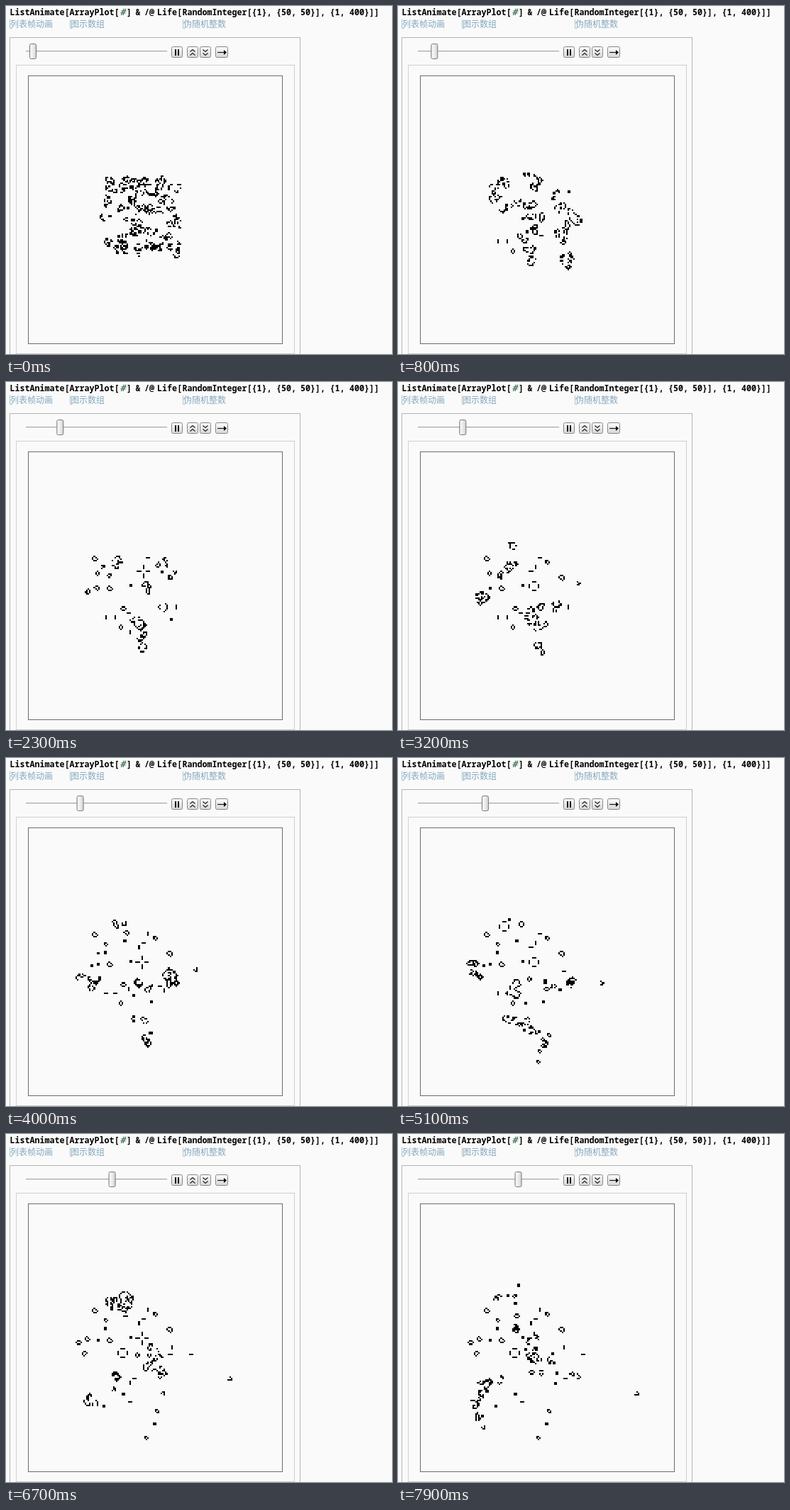
An HTML page with a canvas for the animation above (8 s loop, 544 by 491 pixels).

```html
<!DOCTYPE html>
<html lang="en">
<head>
<meta charset="utf-8">
<title>Life</title>
<style>
html, body { margin: 0; width: 100%; height: 100%; overflow: hidden; background: #fafafa; }
svg, canvas { position: absolute; left: 0; top: 0; width: 544px; height: 491px; }
.code { font: bold 11.67px "Noto Sans Mono", "DejaVu Sans Mono", monospace; fill: #000; }
.code .slot { fill: #437958; font-style: italic; font-size: 13px; }
.hint { font: 300 12px "Noto Sans CJK SC", "Noto Sans CJK", sans-serif; fill: #82a9bc; }
.tick { fill: none; stroke: #a9c3d0; }
.button rect { fill: url(#face); stroke: #858585; }
.icon { fill: none; stroke: #222; stroke-width: 1.3; }
#thumb { animation: slide 8s steps(80) infinite; }
@keyframes slide { to { transform: translateX(133.2px); } }
</style>
</head>
<body>
<svg viewBox="0 0 544 491">
  <defs>
    <linearGradient id="face" x2="0" y2="1">
      <stop offset="0" stop-color="#fcfcfc"/>
      <stop offset="1" stop-color="#d8d8d8"/>
    </linearGradient>
    <linearGradient id="knob">
      <stop offset="0" stop-color="#fafafa"/>
      <stop offset=".5" stop-color="#ededed"/>
      <stop offset="1" stop-color="#cfcfcf"/>
    </linearGradient>
    <path id="chevrons" class="icon" d="M-3.500 -1l3.500-3 3.500 3M-3.500 4l3.500-3 3.500 3"/>
  </defs>
  <g class="code">
    <text x="5.5" y="13">ListAnimate[</text>
    <text x="89.5" y="13">ArrayPlot[</text>
    <text x="160.500" y="13" class="slot">#</text>
    <text x="170" y="13">]</text>
    <text x="182.5" y="13">&amp;</text>
    <text x="195" y="13">/@</text>
    <text x="213" y="13">Life[</text>
    <text x="248.5" y="13">RandomInteger[</text>
    <text x="346.5" y="13">{1},</text>
    <text x="381" y="13">{50,</text>
    <text x="415" y="13">50}],</text>
    <text x="456.5" y="13">{1,</text>
    <text x="484" y="13">400}]]</text>
  </g>
  <g class="hint">
    <text x="6" y="30">列表帧动画</text>
    <text x="91" y="30">图示数组</text>
    <text x="250" y="30">伪随机整数</text>
  </g>
  <path class="tick" d="M5.500 19v12.500h3M90.500 19v12.500h3M249.500 19v12.500h3"/>
  <rect x="5.500" y="44.500" width="409" height="460" fill="none" stroke="#b5b5b5"/>
  <rect x="14.500" y="83.500" width="392" height="407" fill="none" stroke="#d0d0d0"/>
  <rect x="31.500" y="98.500" width="358" height="378" fill="none" stroke="#6b6b6b"/>
  <path d="M28 63.500h199" stroke="#a6a6a6"/>
  <path d="M28 64.500h199" stroke="#e6e6e6"/>
  <rect id="thumb" x="33.500" y="53.500" width="9" height="21" rx="2" fill="url(#knob)" stroke="#777"/>
  <g class="button">
    <rect x="233.500" y="57.500" width="15" height="15" rx="2"/>
    <rect x="255.500" y="57.500" width="15" height="15" rx="2"/>
    <rect x="273.500" y="57.500" width="15" height="15" rx="2"/>
    <rect x="295.500" y="57.500" width="17" height="15" rx="2"/>
  </g>
  <path d="M238 61h2v9h-2zM242 61h2v9h-2z" fill="#000"/>
  <use href="#chevrons" x="263" y="65.500"/>
  <use href="#chevrons" transform="translate(281 65.500) scale(1 -1)"/>
  <path class="icon" d="M298 65.500h11"/>
  <path d="M307 62l4 3.500-4 3.500z"/>
</svg>
<canvas id="board" width="544" height="491"></canvas>
<script>
const COLS = 170, ROWS = 180, CELL = 2.1, LEFT = 31, TOP = 98;
const FRAMES = 80, FRAME_MS = 100;
const FIRST_GEN = 10, GENS_PER_FRAME = 10 / 3;
const SOUP = { col: 52, row: 69, size: 50, seed: 4711 };

// Hollows in the soup: column, row, radius
const HOLLOWS = [[56, 102, 8], [83, 85, 6], [84, 66, 6]];

function randomFrom(seed) {
  return () => {
    seed = (Math.imul(seed, 1664525) + 1013904223) >>> 0;
    return seed / 4294967296;
  };
}

function pourSoup() {
  const grid = new Uint8Array(COLS * ROWS);
  const random = randomFrom(SOUP.seed);
  for (let r = SOUP.row; r < SOUP.row + SOUP.size; r++)
    for (let c = SOUP.col; c < SOUP.col + SOUP.size; c++) {
      const alive = random() < 0.5;
      const hollow = HOLLOWS.some(([x, y, radius]) => Math.hypot(c - x, r - y) < radius);
      if (alive && !hollow) grid[r * COLS + c] = 1;
    }
  return grid;
}

function step(grid) {
  const next = new Uint8Array(grid.length);
  for (let r = 1; r < ROWS - 1; r++)
    for (let c = 1; c < COLS - 1; c++) {
      const i = r * COLS + c, up = i - COLS, down = i + COLS;
      const n = grid[up - 1] + grid[up] + grid[up + 1] + grid[i - 1] + grid[i + 1] +
                grid[down - 1] + grid[down] + grid[down + 1];
      next[i] = n === 3 || (n === 2 && grid[i]) ? 1 : 0;
    }
  return next;
}

function buildHistory() {
  const history = [];
  let grid = pourSoup(), gen = 0;
  for (let n = 0; n < FRAMES; n++) {
    const goal = FIRST_GEN + Math.floor(n * GENS_PER_FRAME);
    for (; gen < goal; gen++) grid = step(grid);
    history.push(grid);
  }
  return history;
}

const history = buildHistory();
const ctx = document.getElementById("board").getContext("2d");
const thumb = document.getElementById("thumb").getAnimations()[0];
const edge = (origin, i) => Math.round(origin + i * CELL);
let shown = -1;

function draw(n) {
  ctx.clearRect(0, 0, 544, 491);
  history[n].forEach((alive, i) => {
    if (!alive) return;
    const c = i % COLS, r = Math.floor(i / COLS);
    const x = edge(LEFT, c), y = edge(TOP, r);
    ctx.fillRect(x, y, edge(LEFT, c + 1) - x, edge(TOP, r + 1) - y);
  });
}

// The slider and the board share one clock
const start = performance.now();
if (thumb) thumb.startTime = document.timeline.currentTime;

function tick() {
  const n = Math.floor((performance.now() - start) / FRAME_MS) % FRAMES;
  if (n !== shown) draw(shown = n);
  requestAnimationFrame(tick);
}
tick();
</script>
</body>
</html>
```
